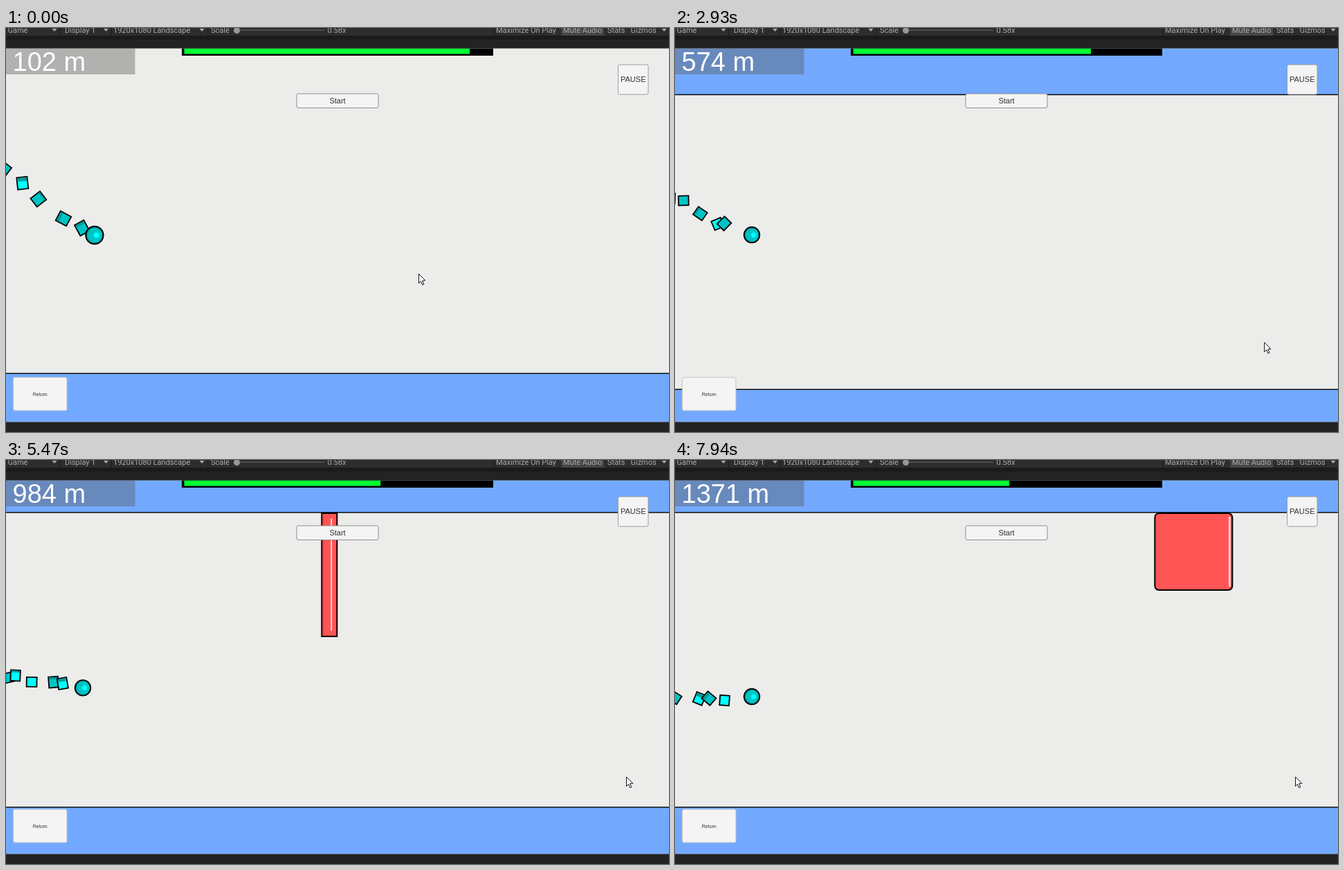
Recreate the animation shown at these times as an HTML page with a canvas. Size 958x584 px, loop 8 s.

```html
<!DOCTYPE html>
<html lang="en">
<head>
<meta charset="utf-8">
<title>Runner</title>
<style>
html, body { margin: 0; width: 100%; height: 100%; overflow: hidden; background: #232323; }
canvas { display: block; }
</style>
</head>
<body>
<canvas id="stage" width="958" height="584"></canvas>
<script>
const ctx = document.getElementById('stage').getContext('2d');
const LOOP = 8000, TOP = 29.5, BOTTOM = 569.5, MIDDLE = 299.5, ARENA = 426;
const PX_PER_M = 4.5, TRAIL_SPEED = 0.725, CUBE_EVERY = 30;
const SANS = '"Liberation Sans", Arial, sans-serif';
const UI = 'Roboto, sans-serif';

const linear = s => s;
const smooth = s => s * s * (3 - 2 * s);

// The flight turns at these [time, height above the floor] points
const TURNS = [[-200, 265], [40, 172], [700, 290], [1200, 190], [1740, 285], [1960, 202], [2700, 285],
  [2980, 218], [3720, 285], [4300, 163], [4850, 275], [5500, 172], [7050, 336], [7820, 156], [8100, 166]];
const DISTANCE = [[0, 102], [5470, 984], [8000, 1380.5]];
const CURSOR = [[0, 596, 355], [2200, 602, 347], [2930, 851, 454], [3200, 896, 457.5]];
const BOX = { w: 114, h: 113, radius: 6 }, PILLAR = { w: 24, h: 180, radius: 0 };
const OBSTACLES = [
  { ...BOX, x: 4233, base: 0 },
  { ...PILLAR, x: 4884, base: 246 },
  { ...PILLAR, x: 5626, base: 66.5 },
  { ...PILLAR, x: 6126, base: 218.5 },
  { ...BOX, x: 6863, base: 313 }
];

const clamp = (v, lo, hi) => Math.min(hi, Math.max(lo, v));
const random = n => { const s = Math.sin(n * 127.1 + 11.7) * 43758.5453; return s - Math.floor(s); };

function along(keys, t, ease, column = 1) {
  let i = 0;
  while (i < keys.length - 2 && t >= keys[i + 1][0]) i++;
  const a = keys[i], b = keys[i + 1];
  return a[column] + (b[column] - a[column]) * ease(clamp((t - a[0]) / (b[0] - a[0]), 0, 1));
}
const heightAt = t => along(TURNS, t, smooth);

function rect(x, y, w, h, fill) {
  ctx.fillStyle = fill;
  ctx.fillRect(x, y, w, h);
}
// Outer size includes the border
function bordered(x, y, w, h, radius, fill, stroke, line) {
  ctx.beginPath();
  ctx.roundRect(x + line / 2, y + line / 2, w - line, h - line, radius);
  ctx.fillStyle = fill;
  ctx.fill();
  ctx.strokeStyle = stroke;
  ctx.lineWidth = line;
  ctx.stroke();
}
function disc(x, y, r, fill) {
  ctx.beginPath();
  ctx.arc(x, y, r, 0, 7);
  ctx.fillStyle = fill;
  ctx.fill();
}
function polygon(points, fill) {
  ctx.beginPath();
  points.forEach(([x, y]) => ctx.lineTo(x, y));
  ctx.closePath();
  ctx.fillStyle = fill;
  ctx.fill();
}
function text(str, x, y, size, family, fill, align = 'left') {
  ctx.font = `${size}px ${family}`;
  ctx.textAlign = align;
  ctx.fillStyle = fill;
  ctx.fillText(str, x, y);
}

function drawObstacle({ x, base, w, h, radius }, view) {
  const left = x - view.distance * PX_PER_M, top = view.floor - (base + h) * view.zoom;
  bordered(left, top, w, h, radius, '#ff5555', '#000', 2);
  if (radius) {
    rect(left + w - 6.5, top + 6, 3, h - 12, '#ffc8c8');
  } else {
    rect(left + 2, top + 2, 2, h - 4, '#d94444');
    rect(left + 14, top + 9, 1.7, h - 18, '#ffe0e0');
  }
}

// A tumbling cube showing one or two faces
function drawCube(n, t, view) {
  const born = (n + (random(n) - 0.5) * 0.9) * CUBE_EVERY, age = t - born;
  if (age < 20) return;
  const x = view.ballX - age * TRAIL_SPEED * view.zoom;
  const y = view.floor - (heightAt(born) + (random(n + 0.3) - 0.5) * 13) * view.zoom;
  const size = 12 * view.zoom, yaw = random(n + 0.5) * 0.8;
  const side = size * Math.sin(yaw) * 0.6, width = size * Math.cos(yaw) + side;
  ctx.save();
  ctx.translate(x, y);
  ctx.rotate(random(n + 0.7) * 3 + age * 0.002);
  rect(-width / 2 - 1.8, -size / 2 - 1.8, width + 3.6, size + 3.6, '#000');
  rect(-width / 2, -size / 2, width, size, random(n + 0.9) < 0.5 ? '#00ffff' : '#00c4c4');
  if (side > 2) rect(-width / 2, -size / 2, side, size, '#009c9c');
  ctx.restore();
}

function drawBall({ ballX, ballY, zoom }) {
  disc(ballX, ballY, 12.2 * zoom, '#000');
  disc(ballX, ballY, 10.3 * zoom, '#00a8a8');
  disc(ballX + 0.6, ballY, 9 * zoom, '#00c4c4');
  disc(ballX + 2.6, ballY, 3.6 * zoom, '#00ffff');
}

function drawBounds({ floor, zoom }) {
  const ceiling = floor - ARENA * zoom;
  rect(0, floor, 958, BOTTOM - floor, '#72a9ff');
  rect(0, TOP, 958, Math.max(0, ceiling - TOP), '#72a9ff');
  for (const y of [floor, ceiling]) rect(0, y - 0.8, 958, 1.4, '#000');
}

function button(label, x, y, w, h, size, border) {
  bordered(x, y, w, h, 2.5, '#f4f4f4', border, 1);
  text(label, x + w / 2, y + h / 2 + size * 0.36, size, SANS, '#323232', 'center');
}

function drawHud(t, distance) {
  rect(0, TOP, 186.5, 37.5, 'rgba(88, 88, 88, 0.4)');
  text(Math.floor(distance) + ' m', 9.5, 62, 38, SANS, '#fff');
  rect(254, TOP, 450, 10.5, '#000');
  rect(257.5, TOP, 412.5 - t * 0.02355, 8, '#00ff32');
  button('Start', 419.5, 94.5, 119, 21.5, 11, '#8f8f8f');
  button('PAUSE', 884, 52.5, 44.5, 44, 11, '#9c9c9c');
  button('Return', 10, 504.5, 78.5, 49, 7, '#c4c4c4');
}

function drawEditor() {
  rect(0, 0, 958, TOP, '#232323');
  rect(0, 0, 958, 11, '#2d2d2d');
  rect(0, 11, 958, 6, '#1b1b1b');
  rect(0, BOTTOM, 958, 584 - BOTTOM, '#232323');
  rect(802, 0, 62, 11, '#464646');
  for (const x of [77, 152, 291, 704]) rect(x, 0, 1, 11, '#1c1c1c');
  const labels = [['Game', 2.5], ['Display 1', 85], ['1920x1080 Landscape', 155], ['Scale', 296],
    ['0.58x', 464.5], ['Maximize On Play', 708], ['Mute Audio', 805], ['Stats', 869], ['Gizmos', 902.5]];
  for (const [label, x] of labels) text(label, x, 7, 11, UI, '#acacac');
  for (const x of [70, 144.5, 283, 951]) polygon([[x - 3.5, 1], [x + 3.5, 1], [x, 5]], '#acacac');
  rect(334, 2.5, 126, 1.5, '#555');
  disc(333.5, 3.5, 4.5, '#999');
}

function drawCursor(t) {
  ctx.save();
  ctx.translate(along(CURSOR, t, linear, 1) + 0.5, along(CURSOR, t, linear, 2) + 0.5);
  polygon([[0, 0], [0, 13.5], [3, 10.7], [5.2, 15.8], [7.3, 14.9], [5.1, 9.8], [9.3, 9.5]], '#fff');
  ctx.strokeStyle = '#111';
  ctx.lineWidth = 1;
  ctx.stroke();
  ctx.restore();
}

function draw(t) {
  const settle = Math.exp(-t / 340), zoom = 1 + 0.12 * settle;
  const height = heightAt(t), distance = along(DISTANCE, t, linear);
  // The camera follows the ball but stops near the floor and the ceiling
  const floor = clamp(MIDDLE + height * zoom, BOTTOM - 67.5 * zoom, TOP + 493 * zoom);
  const view = { zoom, floor, distance, ballX: 111 + 17 * settle, ballY: floor - height * zoom };
  rect(0, 0, 958, 584, '#ececea');
  for (const obstacle of OBSTACLES) drawObstacle(obstacle, view);
  const newest = Math.ceil(t / CUBE_EVERY);
  for (let n = newest - 8; n <= newest; n++) drawCube(n, t, view);
  drawBall(view);
  drawBounds(view);
  drawHud(t, distance);
  drawEditor();
  drawCursor(t);
}

const start = performance.now();
function tick() {
  draw((performance.now() - start) % LOOP);
  requestAnimationFrame(tick);
}
tick();
</script>
</body>
</html>
```
